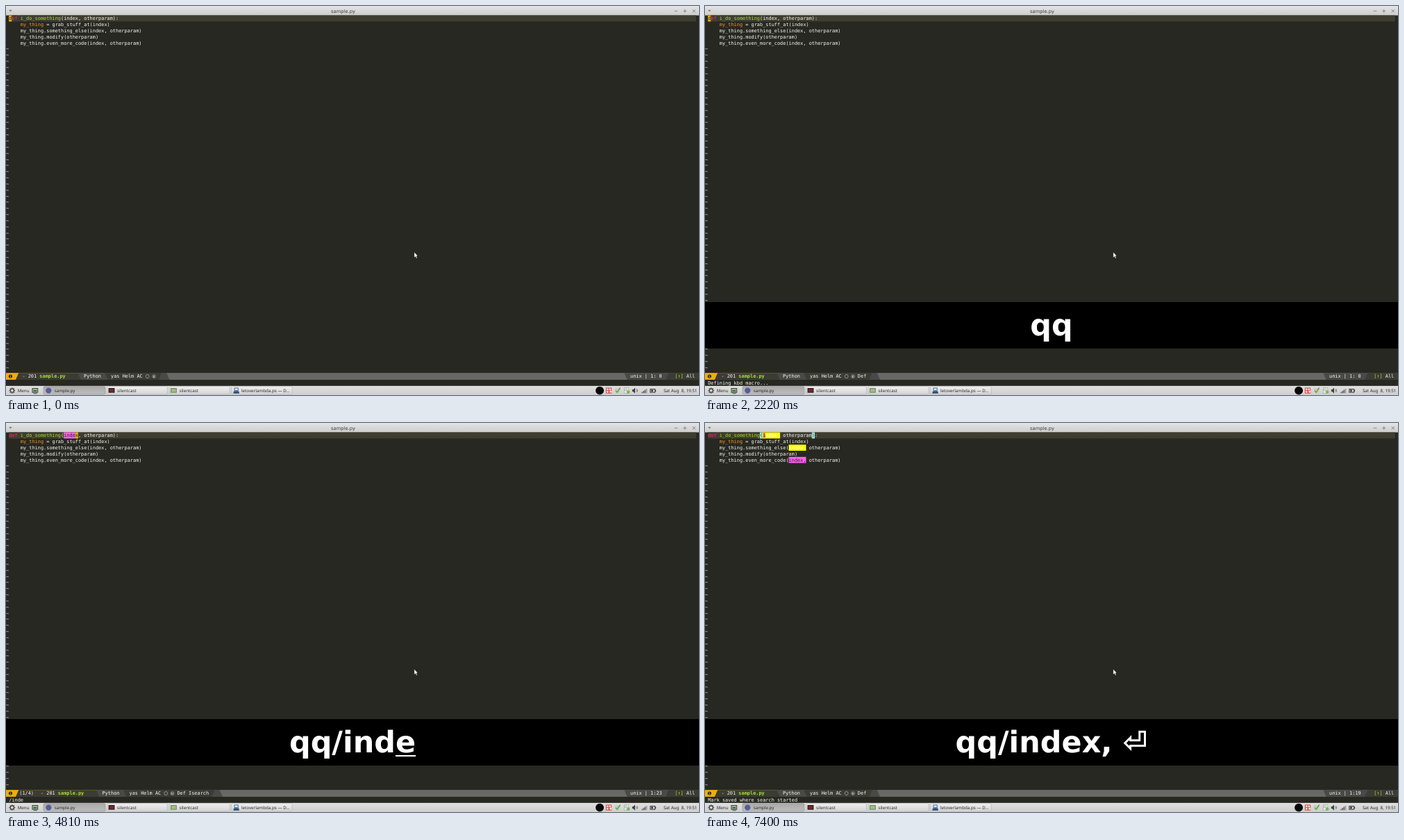
Animation, 998 px wide and 561 px high, one loop 8000 ms. Source, as an HTML page with a canvas:

```html
<!DOCTYPE html>
<html lang="en">
<head>
<meta charset="utf-8">
<title>sample.py</title>
<style>
  html, body { margin: 0; width: 100%; height: 100%; overflow: hidden; background: #272822; }
  canvas { display: block; }
</style>
</head>
<body>
<canvas id="stage" width="998" height="561"></canvas>
<script>
const ctx = document.getElementById('stage').getContext('2d');
const LOOP = 8000;
const SCALE = 998 / 1920; // the desktop is laid out at 1920 px wide
const CHAR = 8, ROW = 17, LEFT = 8, TOP = 26;
const MONO = '"DejaVu Sans Mono", monospace';
const SANS = '"Noto Sans", sans-serif';
const C = {
  bg: '#272822', fg: '#f8f8f2', line: '#3e3d31', red: '#f92672', green: '#a6e22e',
  orange: '#fd971f', cursor: '#eead0e', match: '#fd5ff0', lazy: '#e6db74',
  found: '#ffff00', paren: '#a1efe4', dark: '#3b3c35', mid: '#494a47', fill: '#686966'
};

const code = [
  'def i_do_something(index, otherparam):',
  '    my_thing = grab_stuff_at(index)',
  '    my_thing.something_else(index, otherparam)',
  '    my_thing.modify(otherparam)',
  '    my_thing.even_more_code(index, otherparam)'
];

// A span is [row, column, length, background, text colour].
const cursorAt = col => [0, col, 1, C.cursor, C.bg];
const current = (col, len) => [0, col, len, C.match, C.bg];
const lazy = (row, col, len) => [row, col, len, C.lazy, C.bg];

const states = [
  { at: 0, col: 0, spans: [cursorAt(0)] },
  { at: 1110, keys: 'q', col: 0, noLine: true, spans: [cursorAt(0)] },
  { at: 1850, keys: 'qq', underline: true, col: 0, modes: ' Def', echo: 'Defining kbd macro...', spans: [cursorAt(0)] },
  { at: 2220, keys: 'qq', col: 0, modes: ' Def', echo: 'Defining kbd macro...', spans: [cursorAt(0)] },
  { at: 3330, keys: 'qq/', col: 0, modes: ' Def Isearch', echo: '/', spans: [cursorAt(0)] },
  { at: 4440, keys: 'qq/i', underline: true, col: 5, count: '(1/12)', modes: ' Def Isearch', echo: '/i',
    spans: [current(4, 1), cursorAt(5)] },
  { at: 4810, keys: 'qq/inde', underline: true, col: 23, count: '(1/4)', modes: ' Def Isearch', echo: '/inde',
    spans: [current(19, 4), cursorAt(23)] },
  { at: 5180, keys: 'qq/index', col: 24, count: '(1/4)', modes: ' Def Isearch', echo: '/index',
    spans: [current(19, 5), cursorAt(24), lazy(1, 29, 5), lazy(2, 28, 5), lazy(4, 28, 5)] },
  { at: 5920, keys: 'qq/index,', col: 25, count: '(1/3)', modes: ' Def Isearch', echo: '/index,',
    spans: [current(19, 6), cursorAt(25), lazy(2, 28, 6), lazy(4, 28, 6)] },
  { at: 7400, keys: 'qq/index, \u23ce', col: 19, modes: ' Def', echo: 'Mark saved where search started',
    spans: [[0, 18, 1, C.paren, C.bg], [0, 36, 1, C.paren, C.bg], [0, 19, 6, C.found, C.fg], cursorAt(19),
            [2, 28, 6, C.found, C.fg], [4, 28, 6, C.match, C.bg]] }
];

function rect(x, y, w, h, color) {
  ctx.fillStyle = color;
  ctx.fillRect(x, y, w, h);
}

function poly(color, ...pts) {
  ctx.fillStyle = color;
  ctx.beginPath();
  for (let i = 0; i < pts.length; i += 2) ctx.lineTo(pts[i], pts[i + 1]);
  ctx.fill();
}

function stroke(color, width, ...pts) {
  ctx.strokeStyle = color;
  ctx.lineWidth = width;
  ctx.beginPath();
  for (let i = 0; i < pts.length; i += 2) ctx.lineTo(pts[i], pts[i + 1]);
  ctx.stroke();
}

function disc(x, y, r, color) {
  ctx.fillStyle = color;
  ctx.beginPath();
  ctx.arc(x, y, r, 0, 7);
  ctx.fill();
}

function ring(x, y, r, width, color) {
  ctx.strokeStyle = color;
  ctx.lineWidth = width;
  ctx.beginPath();
  ctx.arc(x, y, r, 0, 7);
  ctx.stroke();
}

function shade(y0, y1, from, to) {
  const g = ctx.createLinearGradient(0, y0, 0, y1);
  g.addColorStop(0, from);
  g.addColorStop(1, to);
  return g;
}

function label(text, x, y, font, color, align = 'left') {
  ctx.font = font;
  ctx.fillStyle = color;
  ctx.textAlign = align;
  ctx.fillText(text, x, y);
}

// Monospaced text on the fixed character grid.
function mono(text, x, y, color = C.fg, weight = '') {
  [...text].forEach((ch, i) => {
    if (ch !== ' ') label(ch, x + i * CHAR, y, `${weight} 13.3px ${MONO}`, color);
  });
}

function drawTitleBar() {
  rect(0, 0, 1920, TOP, shade(0, TOP, '#e4e4e4', '#cdcdcd'));
  label('sample.py', 934, 18.5, '13px "DejaVu Sans", sans-serif', '#3c3c3c', 'center');
  const gray = '#7c7c7c';
  poly(gray, 8, 11, 17, 11, 12.5, 16);
  stroke(gray, 1.6, 1852, 14, 1861, 14);
  stroke(gray, 1.6, 1876, 14, 1886, 14);
  stroke(gray, 1.6, 1881, 9, 1881, 19);
  stroke(gray, 1.8, 1902, 10, 1910, 18);
  stroke(gray, 1.8, 1910, 10, 1902, 18);
}

function drawCode(state) {
  if (!state.noLine) rect(LEFT, TOP, 1904, ROW, C.line);
  const put = (row, col, text, color) => mono(text, LEFT + col * CHAR, TOP + row * ROW + 13, color);
  code.forEach((text, row) => put(row, 0, text));
  const recolor = (row, col, len, bg, fg) => {
    rect(LEFT + col * CHAR, TOP + row * ROW, len * CHAR, ROW, bg);
    put(row, col, code[row].substr(col, len), fg);
  };
  const lineBg = state.noLine ? C.bg : C.line;
  recolor(0, 0, 3, lineBg, C.red);
  recolor(0, 4, 14, lineBg, C.green);
  recolor(1, 4, 8, C.bg, C.orange);
  state.spans.forEach(span => recolor(...span));
  for (let row = code.length; row <= 57; row++) mono('~', 0, TOP + row * ROW + 13);
}

// Fills the mode line from x rightwards, with a leaning left edge.
function segment(x, lean, color) {
  poly(color, x + lean, 1018, 1920, 1018, 1920, 1037, x - lean, 1037);
}

function drawModeLine(state) {
  const { count = '', modes = '' } = state;
  const shift = count ? count.length * CHAR + 11 : 0;
  const end = 449 + shift + modes.length * CHAR;
  const base = 1031.5;
  rect(0, 1018, 1920, 19, C.cursor);
  segment(31, 4, C.dark);
  segment(203 + shift, -4, C.mid);
  segment(278 + shift, -4, C.dark);
  segment(end - 22, 4, C.mid);
  segment(end, -4, C.fill);
  segment(1717, -4, C.mid);
  segment(1832, 4, C.dark);

  disc(12.5, 1027.5, 5, '#272822');
  label('1', 12.5, 1031, `bold 9px ${MONO}`, C.cursor, 'center');
  mono(count, 37, base);
  mono('- 201', 45 + shift, base);
  mono('sample.py', 93 + shift, base, C.green, 'bold');
  mono('Python', 215.5 + shift, base);
  mono('yas Helm AC', 290.5 + shift, base);
  const x = 392 + shift;
  stroke('#d8d8d2', 1, x - 5, 1027.5, x - 2.5, 1023, x + 2.5, 1023, x + 5, 1027.5, x + 2.5, 1032, x - 2.5, 1032, x - 5, 1027.5);
  ring(410 + shift, 1027.5, 4.5, 1, '#d8d8d2');
  label('R', 410 + shift, 1030.5, `8px ${MONO}`, C.fg, 'center');
  mono(modes, 415 + shift, base);

  mono('unix | 1:' + String(state.col).padStart(2), 1729.5, base);
  mono('[\u2191]', 1853, base, C.green);
  mono('All', 1885, base);
}

function taskButton(x, w, text, active) {
  ctx.beginPath();
  ctx.roundRect(x, 1055.5, w, 22, 3);
  ctx.fillStyle = active ? shade(1055, 1078, '#a9a9a9', '#bdbdbd') : shade(1055, 1078, '#f0f0f0', '#d3d3d3');
  ctx.fill();
  ctx.strokeStyle = active ? '#858585' : '#a8a8a8';
  ctx.lineWidth = 1;
  ctx.stroke();
  label(text, x + (w > 169 ? 30 : 27), 1071, `12px ${SANS}`, '#2b2b2b');
}

function screenIcon(x, frame, inside) {
  rect(x, 1060, 17, 13, frame);
  rect(x + 2, 1062, 13, 9, inside);
}

function drawTray() {
  disc(1645, 1067, 11.5, '#080808');
  rect(1662, 1059, 16, 16, '#d94a42');
  rect(1664, 1061, 5, 5, '#f6dedb');
  rect(1671, 1061, 5, 5, '#f6dedb');
  rect(1664, 1068, 5, 5, '#f6dedb');
  disc(1675, 1070, 3, '#f6dedb');
  poly('#c9ccc5', 1687, 1060, 1702, 1060, 1702, 1069, 1694.5, 1076, 1687, 1069);
  stroke('#67a83c', 3, 1689, 1067, 1693, 1072, 1702, 1059);
  rect(1713, 1059, 12, 15, '#f3f3f3');
  stroke('#878787', 1, 1713, 1059, 1725, 1059, 1725, 1074, 1713, 1074, 1713, 1059);
  ring(1718, 1065, 3, 1.2, '#777777');
  disc(1724, 1071, 4.5, '#79b957');
  poly('#444444', 1735, 1064, 1738, 1064, 1743, 1059, 1743, 1075, 1738, 1070, 1735, 1070);
  for (const r of [3, 6]) {
    ctx.strokeStyle = '#555555';
    ctx.lineWidth = 1.5;
    ctx.beginPath();
    ctx.arc(1744, 1067, r, -0.9, 0.9);
    ctx.stroke();
  }
  for (let i = 0; i < 4; i++) rect(1761 + i * 4, 1071 - i * 3, 3, 3 + i * 3, i < 3 ? '#5d5d5d' : '#929292');
  rect(1784, 1062, 15, 11, '#3c3c3c');
  rect(1799, 1065, 2, 5, '#3c3c3c');
  rect(1786, 1064, 11, 7, '#d8d8d8');
  rect(1787, 1065, 6, 5, '#3c3c3c');
  label('Sat Aug  8, 19:51', 1915, 1071, `12px ${SANS}`, '#2b2b2b', 'right');
}

function drawTaskbar() {
  rect(0, 1054, 1920, 26, shade(1054, 1080, '#e0e0e0', '#cecece'));
  ring(17, 1067, 5, 2.6, '#4a4a4a');
  for (let i = 0; i < 8; i++) {
    const a = i * Math.PI / 4, dx = Math.cos(a), dy = Math.sin(a);
    stroke('#4a4a4a', 2.4, 17 + 5 * dx, 1067 + 5 * dy, 17 + 8.5 * dx, 1067 + 8.5 * dy);
  }
  label('Menu', 32, 1071, `12px ${SANS}`, '#2b2b2b');
  screenIcon(72, '#3e4a40', '#95b891');
  rect(76, 1066, 9, 3, '#3e4a40');
  rect(76, 1074, 10, 2, '#505850');
  taskButton(104, 171, 'sample.py', true);
  disc(118, 1067, 8, '#555d9b');
  taskButton(281, 166, 'silentcast');
  screenIcon(284, '#2a1618', '#76262b');
  taskButton(453, 167, 'silentcast');
  screenIcon(456, '#71806b', '#9cc176');
  taskButton(625, 168, 'letoverlambda.ps \u2014 D...');
  rect(632, 1059, 12, 15, '#4b6f9d');
  rect(634, 1061, 8, 5, '#e6edf4');
  rect(630, 1070, 16, 5, '#304e76');
  drawTray();
}

function drawPointer() {
  const tip = [1131, 683, 1131, 698, 1134.5, 695, 1137, 700.5, 1139.5, 699.3, 1137, 694, 1141, 693.5, 1131, 683];
  poly('#ffffff', ...tip);
  stroke('#111111', 0.8, ...tip);
}

// Key caster, in stage pixels.
function drawKeys({ keys, underline }) {
  if (!keys) return;
  rect(0, 427, 998, 67, '#000000');
  ctx.font = 'bold 42.9px "DejaVu Sans", sans-serif';
  const width = ctx.measureText(keys).width;
  const x = 499 - width / 2;
  label(keys, x, 475, ctx.font, '#ffffff');
  if (underline) {
    const last = ctx.measureText(keys.slice(-1)).width;
    rect(x + width - last, 479, last, 2, '#ffffff');
  }
}

function draw(state) {
  ctx.setTransform(SCALE, 0, 0, SCALE, 0, 0);
  ctx.textRendering = 'geometricPrecision';
  rect(0, 0, 1920, 1080, C.bg);
  drawTitleBar();
  drawCode(state);
  drawModeLine(state);
  mono(state.echo || '', LEFT, 1049.5);
  drawTaskbar();
  drawPointer();
  ctx.setTransform(1, 0, 0, 1, 0, 0);
  drawKeys(state);
}

const start = performance.now();
function tick() {
  const t = (performance.now() - start) % LOOP;
  draw(states.findLast(s => s.at <= t));
  requestAnimationFrame(tick);
}
tick();
</script>
</body>
</html>
```
